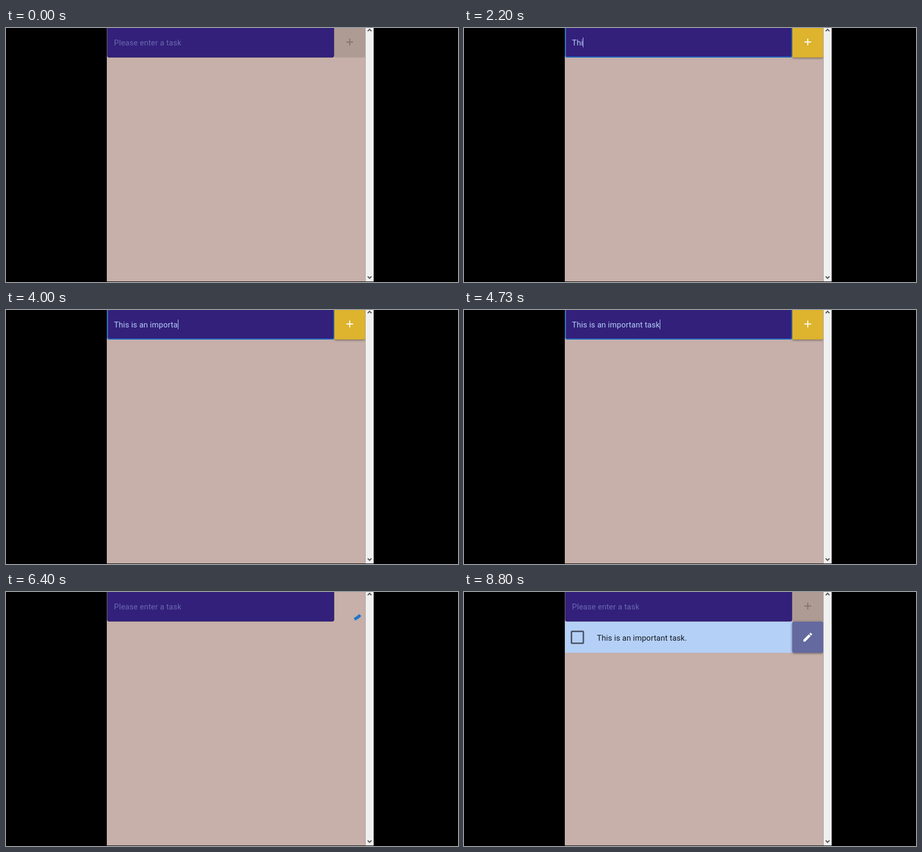
Animation of 852 by 480 pixels, one loop 8.87 s. Source, as an HTML page with a canvas:

```html
<!DOCTYPE html>
<html lang="en">
<head>
<meta charset="utf-8">
<title>Task list</title>
<style>
  html, body { margin: 0; width: 100%; height: 100%; overflow: hidden; background: #000; }
  canvas { display: block; }
</style>
</head>
<body>
<canvas id="stage" width="852" height="480"></canvas>
<script>
const ctx = document.getElementById('stage').getContext('2d');

const LOOP = 8870;
const SCALE = 0.92;
const TASK = 'This is an important task.';
const PLACEHOLDER = 'Please enter a task';
// Time at which each character of TASK is typed.
const KEY_TIMES = [
  1580, 1800, 2060, 2395, 2465,
  2530, 2660, 2730,
  2800, 2865, 2930,
  3130, 3265, 3465, 3600, 3730, 3865, 4000, 4130, 4325, 4395,
  4465, 4530, 4600, 4725, 4930
];
const FOCUS = 860, HOVER = 5990, SUBMIT = 6265, LISTED = 6795;
const BLINK = 530;

const ADD_ICON = new Path2D('M19 13h-6v6h-2v-6H5v-2h6V5h2v6h6z');
const EDIT_ICON = new Path2D('M3 17.25V21h3.75L17.81 9.94l-3.75-3.75L3 17.25z' +
  'M20.71 7.04c.39-.39.39-1.02 0-1.41l-2.34-2.34c-.39-.39-1.02-.39-1.41 0l-1.83 1.83 3.75 3.75 1.83-1.83z');

const PURPLE = [51, 32, 123];
const PALE_BLUE = [180, 208, 247];
const DISABLED = [174, 155, 148];
const DISABLED_ICON = [129, 115, 110];
const YELLOW = [222, 179, 45];
const DARK_YELLOW = [192, 155, 42];
const WHITE = [255, 255, 255];
const BLUE = '#1f75cb';

const clamp = x => Math.max(0, Math.min(1, x));
const smooth = x => { x = clamp(x); return x * x * (3 - 2 * x); };
const mix = (a, b, p) => a.map((v, i) => v + (b[i] - v) * p);
const rgb = c => `rgb(${c.map(Math.round).join(',')})`;

function rounded(x, y, w, h, r) {
  ctx.beginPath();
  ctx.roundRect(x, y, w, h, r);
}

function rect(x, y, w, h, color) {
  ctx.fillStyle = color;
  ctx.fillRect(x, y, w, h);
}

function text(str, x, y, color) {
  ctx.fillStyle = color;
  ctx.fillText(str, x, y);
}

function icon(path, cx, cy, color) {
  ctx.save();
  ctx.translate(cx - 12 * SCALE, cy - 12 * SCALE);
  ctx.scale(SCALE, SCALE);
  ctx.fillStyle = color;
  ctx.fill(path);
  ctx.restore();
}

function button(y, h, color, shadow) {
  ctx.save();
  ctx.shadowColor = `rgba(0,0,0,${0.5 * shadow})`;
  ctx.shadowBlur = 4;
  ctx.shadowOffsetY = 1;
  ctx.fillStyle = color;
  rounded(618.8, y, 58.4, h, 3.5);
  ctx.fill();
  ctx.restore();
}

function chevron(y, dir) {
  ctx.strokeStyle = '#505050';
  ctx.lineWidth = 2;
  ctx.beginPath();
  ctx.moveTo(681.8, y + 2 * dir);
  ctx.lineTo(685.3, y - 1.5 * dir);
  ctx.lineTo(688.8, y + 2 * dir);
  ctx.stroke();
}

function drawInput(t) {
  const typed = t < SUBMIT ? KEY_TIMES.filter(k => k <= t).length : 0;
  const focus = clamp((t - FOCUS + 60) / 180) * (1 - clamp((t - 6190) / 70));
  const focused = t >= FOCUS && t < 6190;

  ctx.fillStyle = rgb(PURPLE);
  rounded(190.6, -5, 428, 60.7, 3.7);
  ctx.fill();
  ctx.strokeStyle = 'rgba(0,0,0,.2)';
  ctx.lineWidth = 0.9;
  rounded(191.1, -5, 427, 60.2, 3.2);
  ctx.stroke();
  if (focused && focus > 0) {
    ctx.globalAlpha = focus;
    ctx.strokeStyle = BLUE;
    ctx.lineWidth = 1.84;
    rounded(191.5, -5, 426.2, 59.8, 2.8);
    ctx.stroke();
    ctx.globalAlpha = 1;
  }

  const content = TASK.slice(0, typed);
  if (typed) text(content, 203.5, 32.8, rgb(PALE_BLUE));
  else text(PLACEHOLDER, 203.5, 32.8, rgb(mix(PURPLE, PALE_BLUE, 0.42)));

  const lastEvent = typed ? KEY_TIMES[typed - 1] : FOCUS;
  if (focused && Math.floor((t - lastEvent) / BLINK) % 2 === 0) {
    const x = Math.round(203.4 + ctx.measureText(content).width);
    rect(x, 18, 1, 18.5, rgb(PALE_BLUE));
  }
}

function drawAddButton(t) {
  const enabled = t < SUBMIT ? smooth((t - KEY_TIMES[0]) / 250) : 0;
  const hover = t < SUBMIT ? smooth((t - HOVER) / 250) : 0;
  const color = mix(DISABLED, mix(YELLOW, DARK_YELLOW, hover), enabled);
  button(-4, 59.7, rgb(color), enabled);
  icon(ADD_ICON, 648, 26.5, rgb(mix(DISABLED_ICON, WHITE, enabled)));
}

function drawSpinner(t) {
  const phase = ((t - SUBMIT) / 1400) % 1;
  const grow = smooth(phase * 2), slide = smooth(phase * 2 - 1);
  const turn = 2 * Math.PI, perimeter = 126.9;
  const offset = 15 * grow + 110 * slide;
  const end = Math.min(perimeter, offset + 1 + 99 * grow);
  ctx.strokeStyle = BLUE;
  ctx.lineWidth = 5.6;
  ctx.beginPath();
  ctx.arc(648, 27.6, 25.3, turn * (phase + offset / perimeter), turn * (phase + end / perimeter));
  ctx.stroke();
}

function drawItem() {
  rect(190.4, 56, 428.6, 58.8, rgb(PALE_BLUE));
  ctx.strokeStyle = '#4b5366';
  ctx.lineWidth = 2.8;
  rounded(202.6, 74.4, 22.4, 22.4, 1.4);
  ctx.stroke();
  text(TASK, 250.6, 91.7, '#151a22');
  button(56, 58.8, '#6469a0', 1);
  icon(EDIT_ICON, 648, 85.4, '#fff');
}

function draw(t) {
  rect(0, 0, 852, 480, '#000');
  ctx.save();
  ctx.beginPath();
  ctx.rect(190, 0, 487.5, 479);
  ctx.clip();
  rect(190, 0, 488, 479, '#c6b0a9');
  drawInput(t);
  if (t >= SUBMIT && t < LISTED) drawSpinner(t);
  else drawAddButton(t);
  if (t >= LISTED) drawItem();
  ctx.restore();

  rect(677.5, 0, 15.5, 479, '#f1f0f0');
  chevron(4, 1);
  chevron(471.5, -1);
}

function frame(now) {
  ctx.font = '14.72px Roboto, sans-serif';
  ctx.letterSpacing = '0.138px';
  draw(now % LOOP);
  requestAnimationFrame(frame);
}
requestAnimationFrame(frame);
</script>
</body>
</html>
```
